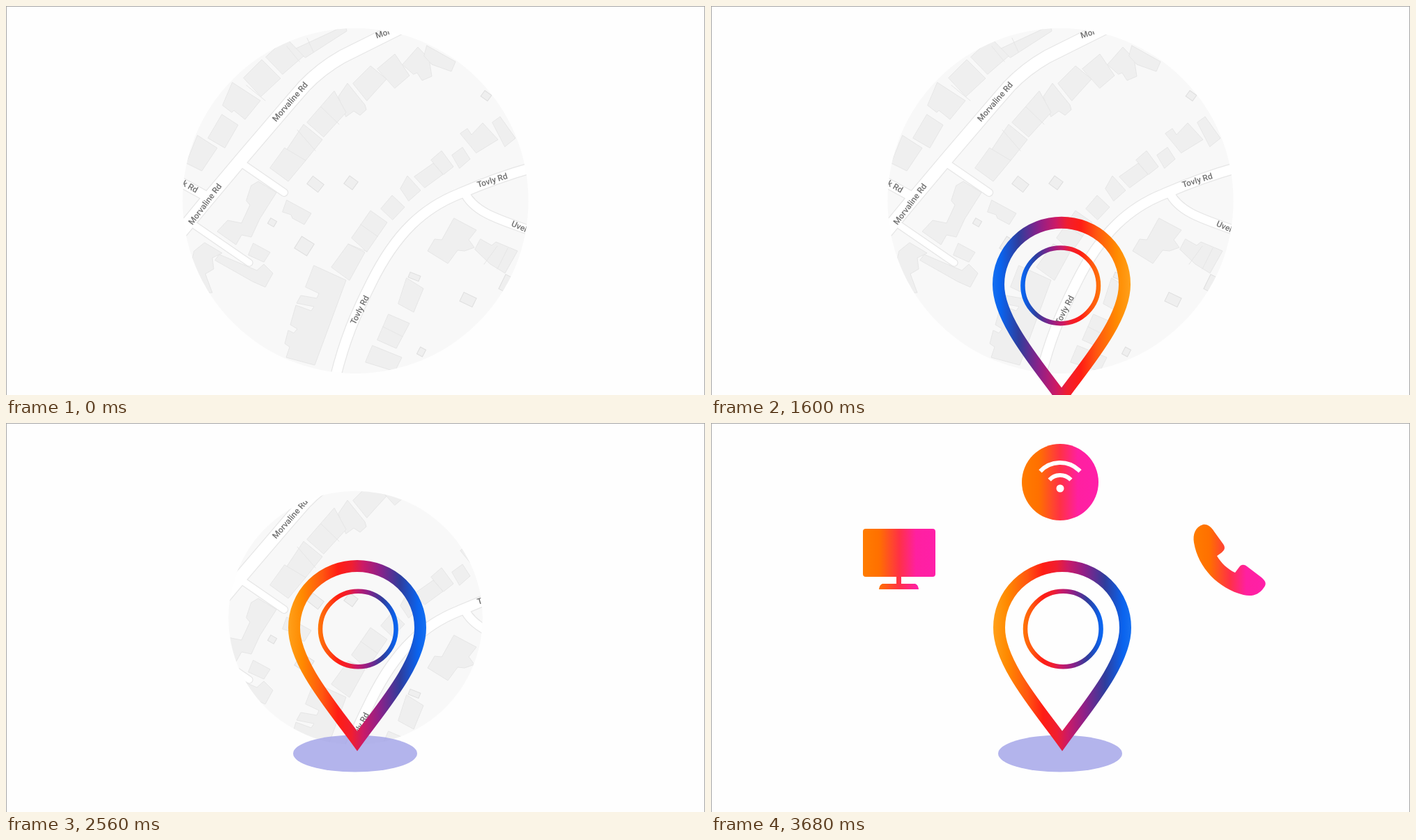
Animation, 1003 px wide and 559 px high, one loop 5040 ms. Source, as an HTML page with a canvas:

```html
<!DOCTYPE html>
<html lang="en">
<head>
<meta charset="utf-8">
<title>Location pin</title>
<style>
html, body { margin: 0; width: 100%; height: 100%; overflow: hidden; background: #fefefe; }
canvas { display: block; }
</style>
</head>
<body>
<canvas id="stage" width="1003" height="559"></canvas>
<script>
const W = 1003, H = 559, LOOP = 5040, STEP = 80, TAU = Math.PI * 2;
const ctx = document.getElementById('stage').getContext('2d');
const MAP = { x: 501.5, y: 280, r: 248 };
const clamp = (v, a = 0, b = 1) => Math.min(b, Math.max(a, v));
const rad = d => d * Math.PI / 180;

// ---- map ----
const roads = [
  [13, 'M245 250L292 276'],
  [18, 'M244 333L286 282L338 220L408 138L428 115Q452 90 482 73L566 31'],
  [10, 'M338 226L399 268'],
  [9, 'M272 316L349 369'],
  [12, 'M658 268C672 298 712 308 756 324'],
  [14, 'M473 532C486 480 500 446 524 398C560 325 600 290 650 270C680 257 716 243 756 232']
];

const northWest = [
  'M414 62L487 28L489 36L430 74Z', 'M373 73L402 46L427 72L397 98Z',
  'M341 103L367 77L394 104L366 130Z',
  'M325 110L365 136L343 163L327 150L324 153L311 143Z',
  'M310 156L333 171L314 204L290 190Z', 'M275 186L303 204L281 237L259 226Z'
];
const north = [
  'M498 111L523 86L546 105L518 136Z', 'M533 90L558 69L579 100L558 118Z',
  'M569 84L591 59L607 76L611 101L597 107L590 96L585 98Z',
  'M604 57L645 80L639 94L611 84L600 72Z',
  'M477 130L490 111L515 142L517 149L508 157L499 151L488 159Z',
  'M432 167L471 122L488 153L456 188Z', 'M403 206L427 170L454 192L430 222Z',
  'M400 204L430 222L405 252L379 233Z'
];
const middle = [
  'M698 167L709 159L731 190L716 202Z',
  'M652 183L662 176L668 185L684 168L706 192L675 211Z',
  'M640 214L655 203L666 220L651 233Z', 'M610 221L625 208L642 231L628 242Z',
  'M586 245L613 226L627 242L601 261Z', 'M566 262L576 244L595 265L578 280Z',
  'M538 291L554 272L572 289L555 307Z', 'M496 333L523 294L547 311L518 353Z',
  'M467 375L491 342L515 354L493 394Z'
];
const southWest = [
  'M442 373L488 394L443 516L402 505L407 490L400 485L405 466L413 470L418 464L408 458L416 430L438 438L442 432L417 427L423 416L446 420L449 413L430 404Z',
  'M403 279L438 298L428 314L411 305L409 300L397 296Z',
  'M352 258L362 252L388 268L364 306L352 332L338 329L330 343L303 324L318 308L338 312L350 286L345 280Z',
  'M300 365L306 357L360 380L370 371L383 384L372 404L354 396Z',
  'M355 341L379 354L370 368L348 358Z',
  'M270 352L285 340L310 355L296 362L298 378L286 385L296 412L290 412L264 380Z'
];
const southEast = [
  'M643 305L675 322L664 336L672 347L658 352L648 351L634 370L605 352L615 335L625 336Z',
  'M681 335L697 344L703 339L734 352L716 384L695 371L673 350Z',
  'M575 391L599 406L585 440L563 428Z', 'M549 443L579 456L560 492L533 480Z',
  'M526 488L568 505L558 525L516 512Z'
];
// x, y, width, height, angle
const sheds = [
  [444, 256, 20, 14, 38], [495, 254, 15, 14, 36], [382, 311, 10, 9, 30],
  [428, 345, 21, 20, 32], [689, 129, 12, 10, 36], [716, 398, 9, 23, 26],
  [663, 422, 20, 14, 26], [586, 389, 16, 8, 22], [596, 497, 9, 11, 28]
];
const labels = [
  ['Morvaline Rd', 408, 138, -49], ['Morvaline Rd', 286, 285, -53],
  ['Tovly Rd', 698, 251, -17], ['Tovly Rd', 508, 437, -63],
  ['k Rd', 264, 260, 30], ['Uvelt', 738, 318, 24], ['Mor', 541, 40, -18]
];

function buildMap() {
  const c = document.createElement('canvas');
  c.width = W;
  c.height = H;
  const g = c.getContext('2d');
  g.fillStyle = '#f8f8f8';
  g.fillRect(0, 0, W, H);
  g.lineCap = 'round';
  for (const [extra, color] of [[2.4, '#e6e6e6'], [0, '#ffffff']]) {
    g.strokeStyle = color;
    for (const [w, d] of roads) {
      g.lineWidth = w + extra;
      g.stroke(new Path2D(d));
    }
  }
  g.fillStyle = '#efefef';
  g.strokeStyle = '#e6e6e6';
  g.lineWidth = 1;
  for (const d of [...northWest, ...north, ...middle, ...southWest, ...southEast]) {
    const p = new Path2D(d);
    g.fill(p);
    g.stroke(p);
  }
  // party walls between terraced houses
  g.stroke(new Path2D('M403 58L421 80M418 178L444 208M452 145L478 170M432 46L441 66M491 342L518 353M509 314L533 331M541 461L569 475M686 371L705 345M705 378L720 348M345 114L372 136'));
  g.strokeStyle = '#dedede';
  for (const [x, y, w, h, a] of sheds) {
    g.save();
    g.translate(x, y);
    g.rotate(rad(a));
    g.fillRect(-w / 2, -h / 2, w, h);
    g.strokeRect(-w / 2, -h / 2, w, h);
    g.restore();
  }
  g.font = '500 12px Roboto, Arial, sans-serif';
  g.textAlign = 'center';
  g.textBaseline = 'middle';
  g.fillStyle = '#707070';
  for (const [s, x, y, a] of labels) {
    g.save();
    g.translate(x, y);
    g.rotate(rad(a));
    g.fillText(s, 0, 0);
    g.restore();
  }
  return c;
}
const mapImage = buildMap();

function drawMap(t) {
  const r = MAP.r * (1 - clamp((t - 2320) / 400) ** 2.6);
  if (r < 1) return;
  ctx.save();
  ctx.beginPath();
  ctx.arc(MAP.x, MAP.y, r, 0, TAU);
  ctx.clip();
  ctx.filter = 'blur(0.6px)';
  ctx.drawImage(mapImage, 0, 0);
  ctx.restore();
}

// ---- pin ----
function ramp(x0, x1, stops) {
  const g = ctx.createLinearGradient(x0, 0, x1, 0);
  for (const [p, c] of stops) g.addColorStop(p, c);
  return g;
}
const rainbow = [
  [0, '#ffa01a'], [0.1, '#ff8a00'], [0.25, '#ff5510'], [0.36, '#ff1d14'],
  [0.46, '#f01e30'], [0.54, '#cc1a66'], [0.66, '#8f2088'], [0.81, '#2f3d9c'],
  [0.94, '#0a63ee'], [1, '#1670f0']
];
const sunset = [[0, '#ff7c00'], [0.22, '#ff7000'], [0.5, '#ff3145'], [0.73, '#ff20a0'], [1, '#ff1fa8']];
const pinPath = new Path2D('M504 457C470 410 413 345 413.5 294A90.5 88.5 0 0 1 594.5 294C595 345 538 410 504 457Z');

function glow(x, y, rx, ry, color, alpha, core) {
  ctx.save();
  ctx.translate(x, y);
  ctx.scale(rx, ry);
  const g = ctx.createRadialGradient(0, 0, 0, 0, 0, 1);
  g.addColorStop(0, `rgba(${color},${alpha})`);
  g.addColorStop(core, `rgba(${color},${alpha})`);
  g.addColorStop(1, `rgba(${color},0)`);
  ctx.fillStyle = g;
  ctx.fillRect(-1, -1, 2, 2);
  ctx.restore();
}

function drawGlow(t) {
  const a = 1 - (t - 1280) / 200;
  if (t < 1280 || a <= 0) return;
  glow(505, 560, 325, 92, '175,155,230', 0.17 * a, 0.25);
  glow(507, 497, 132, 34, '165,165,228', 0.32 * a, 0.6);
}

function drawPin(t) {
  if (t < 1360) return;
  const lift = 409 * (1 - clamp((t - 1280) / 720)) ** 2.3;
  const yaw = TAU * (1 - (1 - clamp((t - 1280) / 800)) ** 1.357);
  const sway = t > 1600 ? Math.sin(yaw) : 0;

  ctx.save();
  ctx.translate(501 + 21 * Math.max(sway, -0.4), 475 + lift * 1.12);
  ctx.rotate(rad(Math.max(36 * sway, -12)));
  ctx.fillStyle = sway < -0.05 ? 'rgba(150,150,230,0.8)' : 'rgba(160,162,232,0.8)';
  if (sway < -0.05) ctx.filter = 'blur(1px)';
  ctx.beginPath();
  ctx.ellipse(0, 0, 89 + 6 * Math.max(sway, -0.5), 26.5, 0, 0, TAU);
  ctx.fill();
  ctx.restore();

  // the body leans while it turns, the ring stays upright
  const turn = (lean, draw) => {
    ctx.save();
    ctx.translate(503.5, 471 + lift);
    ctx.rotate(rad(lean));
    ctx.scale(Math.cos(yaw), 1);
    ctx.translate(-503.5, -471);
    draw();
    ctx.restore();
  };
  turn(Math.max(9 * sway, -4), () => {
    ctx.lineWidth = 17;
    ctx.lineJoin = 'miter';
    ctx.strokeStyle = ramp(405, 603, rainbow);
    ctx.stroke(pinPath);
  });
  turn(0, () => {
    ctx.lineWidth = 6.5;
    ctx.strokeStyle = ramp(426, 567, rainbow);
    ctx.beginPath();
    ctx.arc(505.3, 296, 54.3, 0, TAU);
    ctx.stroke();
  });
}

// ---- icons ----
function monitor() {
  ctx.fillStyle = ramp(218, 322, sunset);
  ctx.beginPath();
  ctx.roundRect(218, 152, 104, 69, 4);
  ctx.rect(266, 220, 7, 13);
  ctx.fill();
  ctx.fill(new Path2D('M246 231H293Q297 232 298 239H241Q242 232 246 231Z'));
}

function wifi() {
  ctx.fillStyle = ramp(446, 556, sunset);
  ctx.beginPath();
  ctx.arc(501, 85, 55, 0, TAU);
  ctx.fill();
  ctx.fillStyle = ctx.strokeStyle = '#fff';
  ctx.beginPath();
  ctx.arc(501, 94, 5.5, 0, TAU);
  ctx.fill();
  ctx.lineWidth = 6;
  for (const r of [21, 39]) {
    ctx.beginPath();
    ctx.arc(501, 96, r, -Math.PI / 2 - 0.82, -Math.PI / 2 + 0.82);
    ctx.stroke();
  }
}

const handset = new Path2D('M706 146C713 145 718 150 722 156L735 174C739 180 736 183 733 186L726 191C732 201 741 210 752 215L758 207C761 203 765 203 769 206L790 222C797 228 797 232 793 237C786 247 776 250 764 247C728 238 699 208 693 172C691 160 695 149 706 146Z');
function phone() {
  ctx.fillStyle = ramp(692, 796, sunset);
  ctx.fill(handset);
}

const icons = [
  { x: 269, y: 195, start: 2720, draw: monitor },
  { x: 501, y: 85, start: 2800, draw: wifi },
  { x: 744, y: 197, start: 2880, draw: phone }
];

function burst(x, y, age) {
  if (age < 150 || age > 340) return;
  const k = (age - 160) / 160, r = 68 + 49 * k;
  ctx.save();
  ctx.globalAlpha = 1 - 0.65 * clamp(k);
  ctx.translate(x, y);
  const g = ctx.createLinearGradient(r - 8, 0, r + 8, 0);
  g.addColorStop(0, '#5f2a78');
  g.addColorStop(0.45, '#d8343f');
  g.addColorStop(1, '#e0505a');
  ctx.fillStyle = g;
  ctx.rotate(-Math.PI / 2);
  for (let i = 0; i < 18; i++) {
    ctx.beginPath();
    ctx.ellipse(r, 0, 8.5, 1.8, 0, 0, TAU);
    ctx.fill();
    ctx.rotate(TAU / 18);
  }
  ctx.restore();
}

function drawIcon({ x, y, start, draw }, t) {
  const age = t - start;
  if (age <= 0) return;
  const n = age / 80;
  const size = n > 6 ? 1 : 1 - Math.exp(-0.916 * n) * Math.cos(0.927 * n);
  burst(x, y, age);
  ctx.save();
  if (age < 200) ctx.filter = `blur(${age < 120 ? 2.5 : 0.8}px)`;
  ctx.translate(x, y);
  ctx.scale(size, size);
  ctx.translate(-x, -y);
  draw();
  ctx.restore();
}

function drawEdge() {
  ctx.fillStyle = '#a6a6a6';
  ctx.fillRect(0, 0, W, 1);
  ctx.fillRect(0, 0, 1, H);
  ctx.fillRect(W - 1, 0, 1, H);
}

function render(t) {
  ctx.fillStyle = '#fefefe';
  ctx.fillRect(0, 0, W, H);
  drawMap(t);
  drawGlow(t);
  drawPin(t);
  for (const icon of icons) drawIcon(icon, t);
  drawEdge();
}

const begin = performance.now();
let shown = -1;
function tick() {
  const t = Math.max(0, performance.now() - begin) % LOOP;
  const step = Math.floor(t / STEP) * STEP;
  if (step !== shown) render(shown = step);
  requestAnimationFrame(tick);
}
tick();
</script>
</body>
</html>
```
